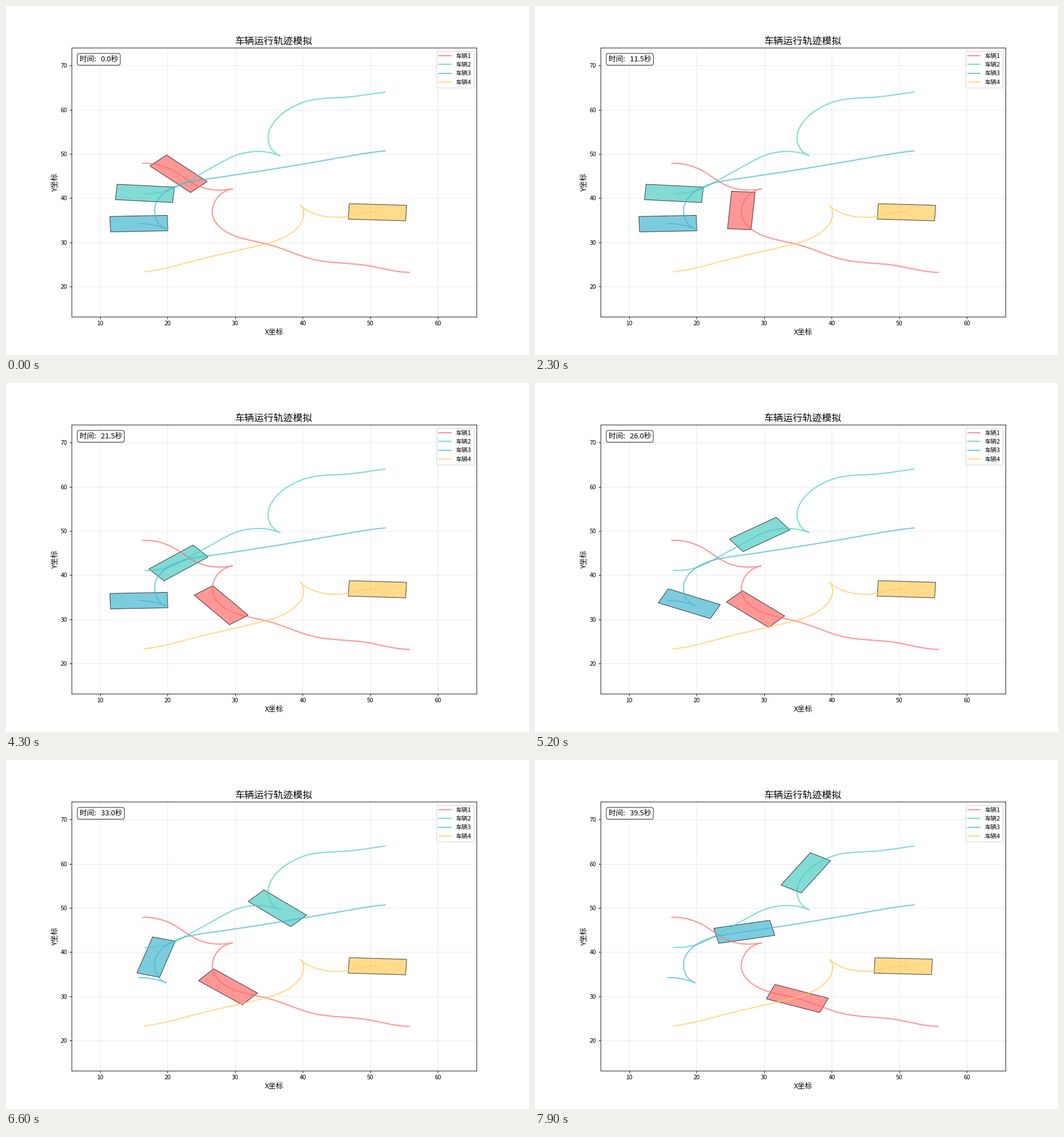
Recreate the animation shown at these times as a matplotlib script. Size 917x611 px, loop 8000 ms.

```python
import numpy as np
import matplotlib.pyplot as plt
from matplotlib.animation import FuncAnimation
from matplotlib.patches import Polygon

plt.rcParams["font.family"] = ["Noto Sans CJK JP", "DejaVu Sans"]

DPI = 76.4
FRAMES = 80
STEP = 0.5  # simulated seconds per frame
LENGTH, WIDTH = 8.5, 3.5
TIMES = np.arange(FRAMES) * STEP


def hermite(t, p0, p1, m0, m1):
    return ((2*t**3 - 3*t**2 + 1) * p0 + (t**3 - 2*t**2 + t) * m0
            + (3*t**2 - 2*t**3) * p1 + (t**3 - t**2) * m1)


def ease(x, xs, ys):
    """Monotone cubic: smooth speed changes, no overshoot at stops."""
    h = np.diff(xs)
    d = np.diff(ys) / h
    total = d[:-1] + d[1:]
    inner = 2 * d[:-1] * d[1:] / np.where(total == 0, 1, total)
    m = np.concatenate([d[:1], inner, d[-1:]])
    k = np.clip(np.searchsorted(xs, x, side="right") - 1, 0, len(h) - 1)
    t = (x - xs[k]) / h[k]
    return hermite(t, ys[k], ys[k + 1], h[k] * m[k], h[k] * m[k + 1])


def steer(a, b, gear, t):
    """Arc-like curve between two poses (x, y, degrees), with its heading."""
    p0, p1 = np.array(a[:2]), np.array(b[:2])
    h0, h1 = np.radians([a[2], b[2]])
    pull = gear * np.hypot(*(p1 - p0)) / np.cos((h1 - h0) / 4) ** 2
    m0, m1 = (pull * np.array([np.cos(h), np.sin(h)]) for h in (h0, h1))
    p = hermite(t[:, None], p0, p1, m0, m1)
    dx, dy = gear * np.gradient(p, axis=0, edge_order=2).T
    return p, np.arctan2(dy, dx)


class Car:
    """Drives forward through the poses up to the cusp, then backs away.

    keys are (time, position along the path counted in poses).
    """

    def __init__(self, color, poses, cusp, keys):
        self.color = color
        t = np.linspace(0, 1, 41)
        legs = [steer(a, b, 1 if k < cusp else -1, t)
                for k, (a, b) in enumerate(zip(poses, poses[1:]))]
        self.path = np.concatenate([p for p, _ in legs])
        turn = np.unwrap(np.concatenate([h for _, h in legs]))
        u = np.concatenate([k + t for k in range(len(legs))])
        s = np.append(0, np.cumsum(np.hypot(*np.diff(self.path, axis=0).T)))

        when, where = np.array(keys, float).T
        now = ease(TIMES, when, np.interp(where, u, s))
        self.x, self.y, self.heading = (
            np.interp(now, s, v) for v in (*self.path.T, turn))

    def corners(self, i):
        c, s = np.cos(self.heading[i]), np.sin(self.heading[i])
        box = np.array([[-1, -1], [1, -1], [1, 1], [-1, 1]]) * [LENGTH / 2, WIDTH / 2]
        return box @ np.array([[c, s], [-s, c]]) + [self.x[i], self.y[i]]


red = Car(
    "#FF6B6B",
    [(16.33, 47.88, 4), (21.61, 45.53, -45), (24.18, 43.03, -38),
     (29.59, 42.13, 18), (26.61, 37.22, 86), (28.81, 32.27, 138.5),
     (31.53, 30.72, 160), (34.9, 29.53, 158.6), (41.91, 26.04, 162),
     (48.41, 25.01, 170), (55.76, 23.22, 178)],
    3,
    [(0, 1), (5, 2.82), (9, 3.5), (11.5, 4), (13.5, 4.3), (18, 4.36),
     (21.5, 4.77), (22.5, 4.93), (35.5, 5.12), (39.5, 7)])

teal = Car(
    "#4ECDC4",
    [(16.63, 41.09, -4.4), (21.61, 42.77, 39.7), (28.83, 48.84, 40),
     (36.64, 49.62, -33), (34.91, 52.84, -82.8), (36.15, 57.95, -120.8),
     (39.97, 61.64, -150), (45.88, 62.8, -175), (52.13, 63.99, -169)],
    3,
    [(0, 0), (16.5, 0), (21.5, 1), (27, 2.3), (30, 2.79), (32.5, 3),
     (35.5, 4), (39.5, 5)])

blue = Car(
    "#45B7D1",
    [(15.74, 34.25, 1.7), (19.79, 33.08, -31), (18.06, 37.22, -89),
     (20.23, 42.0, -137), (27.05, 44.61, -167.7), (45.04, 49.04, -165),
     (52.17, 50.69, -172)],
    1,
    [(0, 0), (22, 0), (27, 1), (30, 1.58), (35.5, 3), (39.5, 4)])

yellow = Car(
    "#FFCC5C",
    [(51.05, 36.83, 177.4), (50.5, 36.85, 177.4), (45.04, 35.67, 180),
     (39.68, 38.38, 122), (40.14, 36.4, 88), (34.9, 29.85, 22),
     (24.77, 26.17, 21), (16.54, 23.35, 9)],
    3,
    [(0, 0), (38, 0), (39.5, 0.85)])

cars = [red, teal, blue, yellow]

fig, ax = plt.subplots(figsize=((917 + 1e-6) / DPI, (611 + 1e-6) / DPI), dpi=DPI)
ax.set_xlim(5.745, 65.745)
ax.set_ylim(13.22, 74.0)
ax.set_xlabel("X坐标", fontsize=12)
ax.set_ylabel("Y坐标", fontsize=12, labelpad=2)
ax.set_title("车辆运行轨迹模拟", fontsize=16)
ax.grid(True, alpha=0.3)

bodies = []
for n, car in enumerate(cars, 1):
    ax.plot(*car.path.T, color=car.color, lw=2, alpha=0.7, label=f"车辆{n}")
    body = Polygon(car.corners(0), closed=True, facecolor=car.color,
                   edgecolor="black", lw=1, alpha=0.7)
    bodies.append(ax.add_patch(body))
ax.legend(loc="upper right")

clock = ax.text(0.02, 0.95, "", transform=ax.transAxes, fontsize=12,
                bbox=dict(boxstyle="round", facecolor="white", alpha=0.8))


def update(i):
    for car, body in zip(cars, bodies):
        body.set_xy(car.corners(i))
    clock.set_text(f"时间:   {TIMES[i]:.1f}秒")
    return [*bodies, clock]


anim = FuncAnimation(fig, update, frames=FRAMES, interval=100, repeat=True,
                     repeat_delay=0)
plt.show()
```
